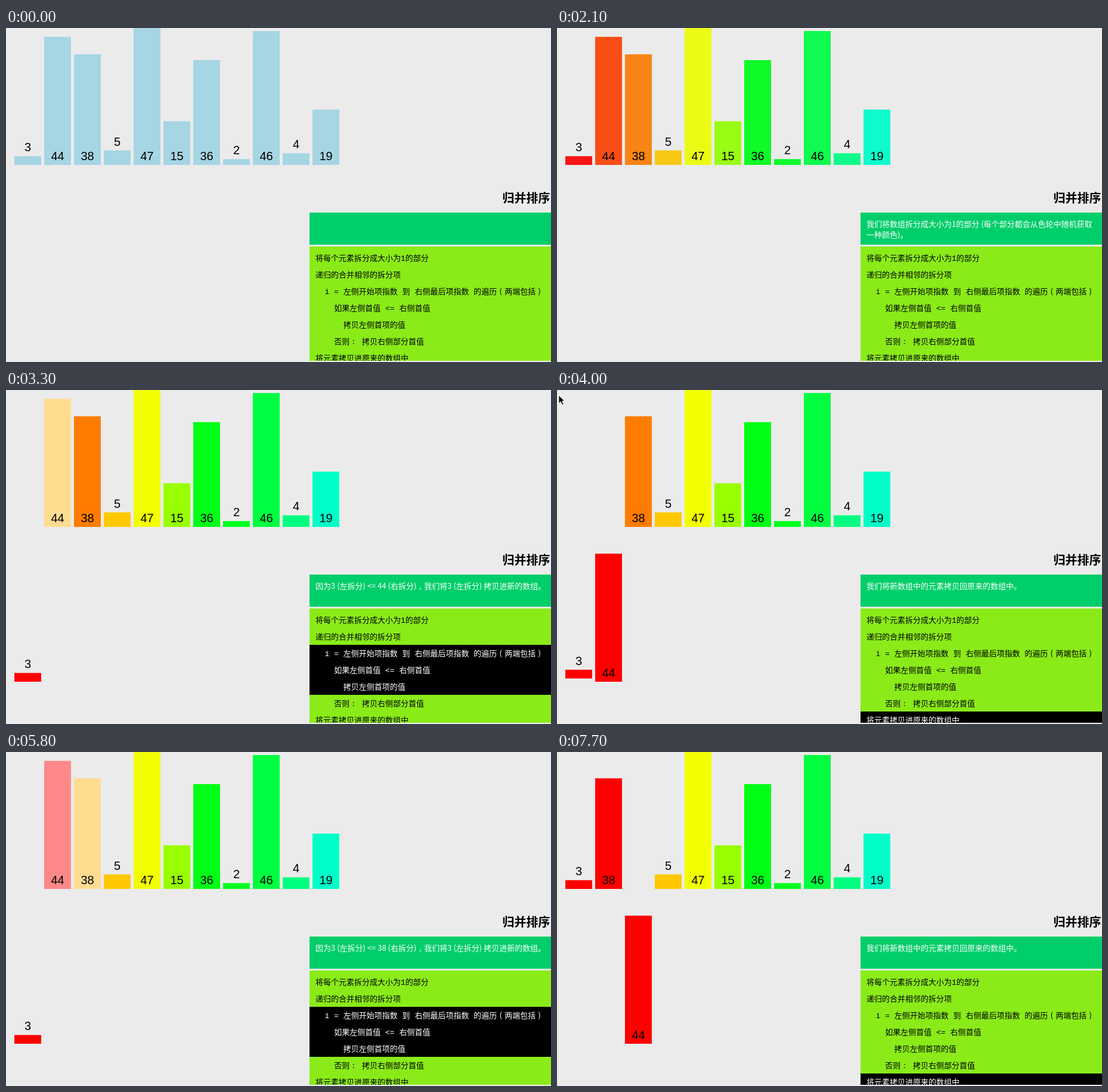
These frames come from a looping animation (914 px wide and 561 px high, 8 s). An HTML page:

```html
<!DOCTYPE html>
<html lang="zh-CN">
<head>
<meta charset="utf-8">
<style>
  html, body { margin: 0; width: 100%; height: 100%; overflow: hidden; background: #ebebeb; }
  svg { display: block; }
  text { white-space: pre; }
  .label { font: 20px "Liberation Sans", Arial, sans-serif; text-anchor: middle; }
  .title { font: bold 20px "Noto Sans CJK SC", "Noto Sans CJK", sans-serif; }
  .status, .wide { font: 13px "Noto Sans CJK SC", "Noto Sans CJK", sans-serif; }
  .status { fill: #fff; }
  .code { font: 13px "Liberation Mono", "Noto Sans CJK SC", "Noto Sans CJK", monospace; }
</style>
</head>
<body>
<svg id="stage" width="914" height="561" viewBox="0 0 914 561">
  <clipPath id="panel"><rect x="509" y="367" width="405" height="192"/></clipPath>
  <rect width="914" height="561" fill="#ebebeb"/>
  <g id="bars"></g>
  <text class="title" x="832.5" y="293">归并排序</text>
  <rect x="509" y="310" width="405" height="54" fill="#00ce6a"/>
  <text class="status" id="status1" x="519" y="334"></text>
  <text class="status" id="status2" x="519" y="352"></text>
  <g clip-path="url(#panel)">
    <rect x="509" y="367" width="405" height="192" fill="#8aeb19"/>
    <g id="code"></g>
  </g>
  <path id="cursor" d="M3 9V22.5L6.2 19.6L8.6 25L11 24L8.6 18.6H12.6Z" fill="#000" stroke="#fff" stroke-width=".8"/>
</svg>
<script>
const LOOP = 8000, TICK = 100, PACE = 0.286;
const TOP = 230, LOW = 490, UNIT = 4.89;
const RED = '#ff0000', LEFT = '#ff8888', RIGHT = '#ffdc90', IDLE = '#a6d5e4';
const values = [3, 44, 38, 5, 47, 15, 36, 2, 46, 4, 19];
const wheel = [RED, '#ff4000', '#ff7c00', '#ffc800', '#f2ff00', '#99ff00',
  '#00ff14', '#00ff1e', '#00ff40', '#00ff80', '#00ffc8'];
const code = [
  [0, '将每个元素拆分成大小为1的部分'],
  [0, '递归的合并相邻的拆分项'],
  [2, 'i = 左侧开始项指数 到 右侧最后项指数 的遍历（两端包括）'],
  [4, '如果左侧首值 <= 右侧首值'],
  [6, '拷贝左侧首项的值'],
  [4, '否则： 拷贝右侧部分首值'],
  [0, '将元素拷贝进原来的数组中']
];

const $ = id => document.getElementById(id);
const slot = i => 14 + 50 * i;
const put = (i, base) => ({ x: slot(i), base, color: RED });
const paint = color => ({ color });
const merge = (left, right) => `现在我们将拆分项 [${left}] (指数从 0 到 ${right}`;
const copy = (why, what) => `因为${why}，我们将${what} 拷贝进新的数组。`;
const back = '我们将新数组中的元素拷贝回原来的数组中。';

// at: start, p: progress on the first tick, lines: highlighted code, set: new bar states
const steps = [
  { at: 0, p: 1, lines: [], text: '', set: {} },
  { at: 2000, p: .43, lines: [],
    text: '我们将数组拆分成大小为1的部分 (每个部分都会从色轮中随机获取\n一种颜色)。',
    set: Object.fromEntries(values.map((v, i) => [v, paint(wheel[i])])) },
  { at: 2500, p: .43, lines: [1],
    text: merge('3', 0) + '，两边都包括) 和 [44] 指数从 1 到\n1 ，两边都包括) 归并在一起。',
    set: { 3: paint(LEFT), 44: paint(RIGHT) } },
  { at: 3000, p: .124, lines: [2, 3, 4],
    text: copy('3 (左拆分) <= 44 (右拆分)', '3 (左拆分)'), set: { 3: put(0, LOW) } },
  { at: 3500, p: .43, lines: [2, 5],
    text: copy('左拆分是空的', '44 (右拆分)'), set: { 44: put(1, LOW) } },
  { at: 4000, p: .174, lines: [6], text: back, set: { 3: put(0, TOP) } },
  { at: 4500, p: .2, lines: [6], text: back, set: { 44: put(1, TOP) } },
  { at: 5000, p: .43, lines: [1],
    text: merge('3,44', 1) + '，两边都包括) 和 [38] 指数从 2\n到 2 ，两边都包括) 归并在一起。',
    set: { 3: paint(LEFT), 38: paint(RIGHT) } },
  { at: 5500, p: .25, lines: [2, 3, 4],
    text: copy('3 (左拆分) <= 38 (右拆分)', '3 (左拆分)'),
    set: { 3: put(0, LOW), 44: paint(LEFT) } },
  { at: 6000, p: .275, lines: [2, 5],
    text: copy('44 (左拆分) > 38 (右拆分)', '38 (右拆分)'), set: { 38: put(1, LOW) } },
  { at: 6500, p: .3, lines: [2, 3, 4],
    text: copy('右拆分是空的', '44 (左拆分)'), set: { 44: put(2, LOW) } },
  { at: 7000, p: .325, lines: [6], text: back, set: { 3: put(0, TOP) } },
  { at: 7500, p: .43, lines: [6], text: back, set: { 38: put(1, TOP) } }
];

const ease = t => t < .5 ? 4 * t ** 3 : 1 - 4 * (1 - t) ** 3;
const mix = (a, b, t) => a + (b - a) * t;
const channels = c => [1, 3, 5].map(i => parseInt(c.slice(i, i + 2), 16));
const rgb = c => `rgb(${c.map(Math.round)})`;

function add(parent, tag, attrs) {
  const el = document.createElementNS('http://www.w3.org/2000/svg', tag);
  for (const k in attrs) el.setAttribute(k, attrs[k]);
  return parent.appendChild(el);
}

// Full-width punctuation sits in the middle of its cell.
function write(el, text) {
  el.textContent = '';
  let gap = 0;
  text.split(/([，：（）])/).forEach((part, i) => {
    if (!part) return;
    if (i % 2) {
      const pad = '（）'.includes(part) ? .331 : .361;
      const mark = ',:()'['，：（）'.indexOf(part)];
      add(el, 'tspan', { class: 'wide', dx: 13 * (pad + gap) }).textContent = mark;
      gap = pad;
    } else {
      add(el, 'tspan', { dx: 13 * gap }).textContent = part;
      gap = 0;
    }
  });
}

const bars = values.map(v => ({
  v, h: v * UNIT,
  rect: add($('bars'), 'rect', { width: 45, height: v * UNIT }),
  label: add($('bars'), 'text', { class: 'label' })
}));
bars.forEach(b => b.label.textContent = b.v);

const rows = code.map(([indent, text], i) => {
  const band = add($('code'), 'rect', { x: 509, y: 372 + 28 * i, width: 405, height: 28 });
  const line = add($('code'), 'text', { class: 'code', x: 519 + indent * 7.8, y: 391 + 28 * i });
  write(line, text);
  return { band, line };
});

let shown;
function showStep(step) {
  if (step === shown) return;
  shown = step;
  const [first, second = ''] = step.text.split('\n');
  write($('status1'), first);
  write($('status2'), second);
  rows.forEach(({ band, line }, i) => {
    const on = step.lines.includes(i);
    band.setAttribute('visibility', on ? 'visible' : 'hidden');
    line.setAttribute('fill', on ? '#fff' : '#000');
  });
}

function barState(v, i, time) {
  const s = { x: slot(i), base: TOP, color: channels(IDLE) };
  for (const { at, p, set } of steps) {
    if (at > time) break;
    const goal = set[v];
    if (!goal) continue;
    const k = ease(Math.min(1, p + PACE * Math.floor((time - at) / TICK)));
    if (goal.base) {
      s.x = mix(s.x, goal.x, k);
      s.base = mix(s.base, goal.base, k);
    }
    const c = channels(goal.color);
    s.color = s.color.map((from, n) => mix(from, c[n], k));
  }
  return s;
}

function draw(time) {
  showStep(steps.filter(s => s.at <= time).pop());
  bars.forEach(({ v, h, rect, label }, i) => {
    const { x, base, color } = barState(v, i, time);
    rect.setAttribute('x', x);
    rect.setAttribute('y', base - h);
    rect.setAttribute('fill', rgb(color));
    label.setAttribute('x', x + 22.5);
    label.setAttribute('y', h < 40 ? base - h - 8 : base - 8);
  });
  $('cursor').setAttribute('visibility', time >= 4000 && time < 4200 ? 'visible' : 'hidden');
}

function frame() {
  draw(performance.now() % LOOP);
  requestAnimationFrame(frame);
}
draw(0);
requestAnimationFrame(frame);
</script>
</body>
</html>
```
